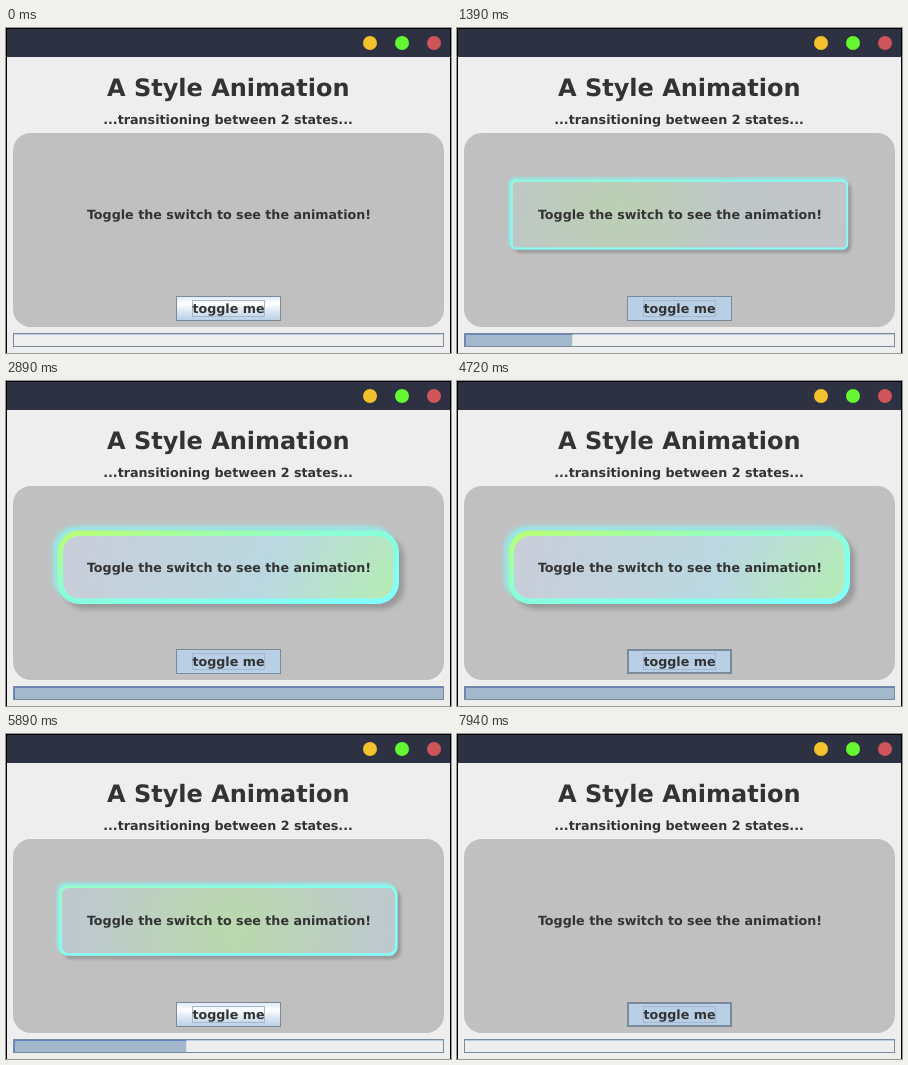
These frames come from a looping animation (445x325 px, 8 s). An HTML page:

```html
<!DOCTYPE html>
<html lang="en">
<head>
<meta charset="utf-8">
<title>A Style Animation</title>
<style>
  html, body { margin: 0; width: 100%; height: 100%; overflow: hidden; background: #eee; }
  svg { display: block; }
  text {
    font: bold 12.7px "DejaVu Sans", sans-serif;
    fill: #333;
    text-anchor: middle;
    text-rendering: geometricPrecision;
  }
  .title { font-size: 24px; }
</style>
</head>
<body>
<svg width="445" height="325" viewBox="0 0 445 325">
  <defs>
    <linearGradient id="buttonUp" x1="0" y1="0" x2="0" y2="1">
      <stop offset="0" stop-color="#dde8f3"/>
      <stop offset=".3" stop-color="#fff"/>
      <stop offset=".6" stop-color="#dde8f3"/>
      <stop offset="1" stop-color="#b8cfe5"/>
    </linearGradient>
    <linearGradient id="rim" x1="0" y1="0" x2="1" y2="1">
      <stop id="rimStart" offset="0"/>
      <stop id="rimMid" offset=".42"/>
      <stop offset="1" stop-color="#80ffff"/>
    </linearGradient>
    <radialGradient id="light" gradientUnits="userSpaceOnUse">
      <stop offset="0" stop-color="rgb(176,255,140)"/>
      <stop offset=".5" stop-color="rgb(186,216,224)"/>
      <stop offset="1" stop-color="rgb(202,204,216)"/>
    </radialGradient>
    <filter id="blur" filterUnits="userSpaceOnUse" x="20" y="120" width="410" height="140">
      <feGaussianBlur id="blurSize"/>
    </filter>
  </defs>

  <!-- window -->
  <rect width="445" height="325" fill="#000"/>
  <rect x="1" y="1" width="443" height="28" fill="#2d3142"/>
  <rect x="1" y="29" width="443" height="296" fill="#eee"/>
  <circle cx="364" cy="15" r="7" fill="#f3c02e"/>
  <circle cx="396" cy="15" r="7" fill="#64f832"/>
  <circle cx="428" cy="15" r="7" fill="#cf555b"/>
  <text class="title" x="222.3" y="68">A Style Animation</text>
  <text x="222" y="96">...transitioning between 2 states...</text>
  <rect x="7" y="105" width="431" height="194" rx="18" fill="#c0c0c0"/>

  <!-- animated card -->
  <rect id="glow" fill="#80ffff" filter="url(#blur)"/>
  <rect id="shadow" fill="#000" filter="url(#blur)"/>
  <rect id="base" fill="#c0c0c0"/>
  <rect id="tint" fill="url(#light)"/>
  <rect id="border" fill="none" stroke="url(#rim)"/>
  <text x="223" y="191">Toggle the switch to see the animation!</text>

  <!-- toggle button -->
  <rect id="button" x="170.5" y="268.5" width="104" height="24" stroke="#7a8a99"/>
  <rect id="pressed" x="171.5" y="269.5" width="102" height="22" fill="none" stroke="#7a8a99"/>
  <rect x="186.5" y="272.5" width="72" height="16" fill="none" stroke="#a3b8cc"/>
  <text x="222.5" y="285">toggle me</text>

  <!-- progress bar -->
  <rect x="7.5" y="305.5" width="430" height="13" fill="#eee" stroke="#7a8a99"/>
  <path d="M8 306.5H437" stroke="#b8cfe5"/>
  <rect id="fill" x="8" y="306" height="12" fill="#a3b8cc"/>
  <path id="fillEdge" fill="none" stroke="#6382bf"/>
</svg>
<script>
const LOOP = 8000, DURATION = 2000, STEP = DURATION / 36;
const ON = 890, OFF = 4720, PRESS = 7940;
const $ = id => document.getElementById(id);
const set = (id, attrs) => {
  for (const key in attrs) $(id).setAttribute(key, attrs[key]);
};
const clamp = v => Math.min(1, Math.max(0, v));
const mix = (a, b, p) => `rgb(${a.map((v, i) => v + (b[i] - v) * p)})`;
const CYAN = [128, 255, 255];

// The display refreshes in fixed steps.
const stepsSince = (t, start) => Math.floor((t - start + 5) / STEP);

function progress(t) {
  if (t < ON) return 0;
  if (t < OFF) return clamp(stepsSince(t, ON) / 36);
  const k = stepsSince(t, OFF);
  return k < 1 ? 1 : clamp(1 - (k * STEP + 30) / DURATION);
}

function drawCard(p) {
  const x = 54.5 - 3 * p, y = 152.5 - 3 * p;
  const width = 390.5 + 2.5 * p - x, height = 221 + 2 * p - y;
  const radius = 22 * p, line = 0.7 + 4.8 * p, fade = clamp(p * 4);
  const outer = { x, y, width, height, rx: radius };
  const inner = {
    x: x + line / 2, y: y + line / 2,
    width: width - line, height: height - line,
    rx: Math.max(0, radius - line / 2)
  };
  const shift = 1.5 + 2.5 * p;

  set("blurSize", { stdDeviation: 1 + 1.8 * p });
  set("glow", { ...outer, x: x - shift, y: y - shift, opacity: 0.7 * fade });
  set("shadow", { ...outer, x: x + shift + 1, y: y + shift + 1, opacity: 0.2 * fade });
  set("base", outer);
  set("tint", { ...inner, opacity: p });
  set("border", { ...inner, "stroke-width": line, opacity: fade });
  set("light", { cx: 50 + 440 * p, cy: 152 + 110 * p, r: 170 + 300 * p });
  set("rimStart", { "stop-color": mix(CYAN, [186, 255, 116], p) });
  set("rimMid", { "stop-color": mix(CYAN, [138, 255, 214], p) });
}

function drawBar(p) {
  const width = 429 * p, edge = 8 + width;
  set("fill", { width });
  set("fillEdge", { d: p > 0 ? `M8.5 318V306.5H${edge}` : "" });
}

function drawButton(t) {
  const pressed = t >= PRESS || (t >= OFF && stepsSince(t, OFF) < 1);
  const selected = t >= ON && t < OFF;
  set("button", { fill: pressed || selected ? "#b8cfe5" : "url(#buttonUp)" });
  set("pressed", { opacity: pressed ? 1 : 0 });
}

function draw(t) {
  const p = progress(t);
  drawCard(p);
  drawBar(p);
  drawButton(t);
}

const start = performance.now();
function tick() {
  draw((performance.now() - start) % LOOP);
  requestAnimationFrame(tick);
}
tick();
</script>
</body>
</html>
```
